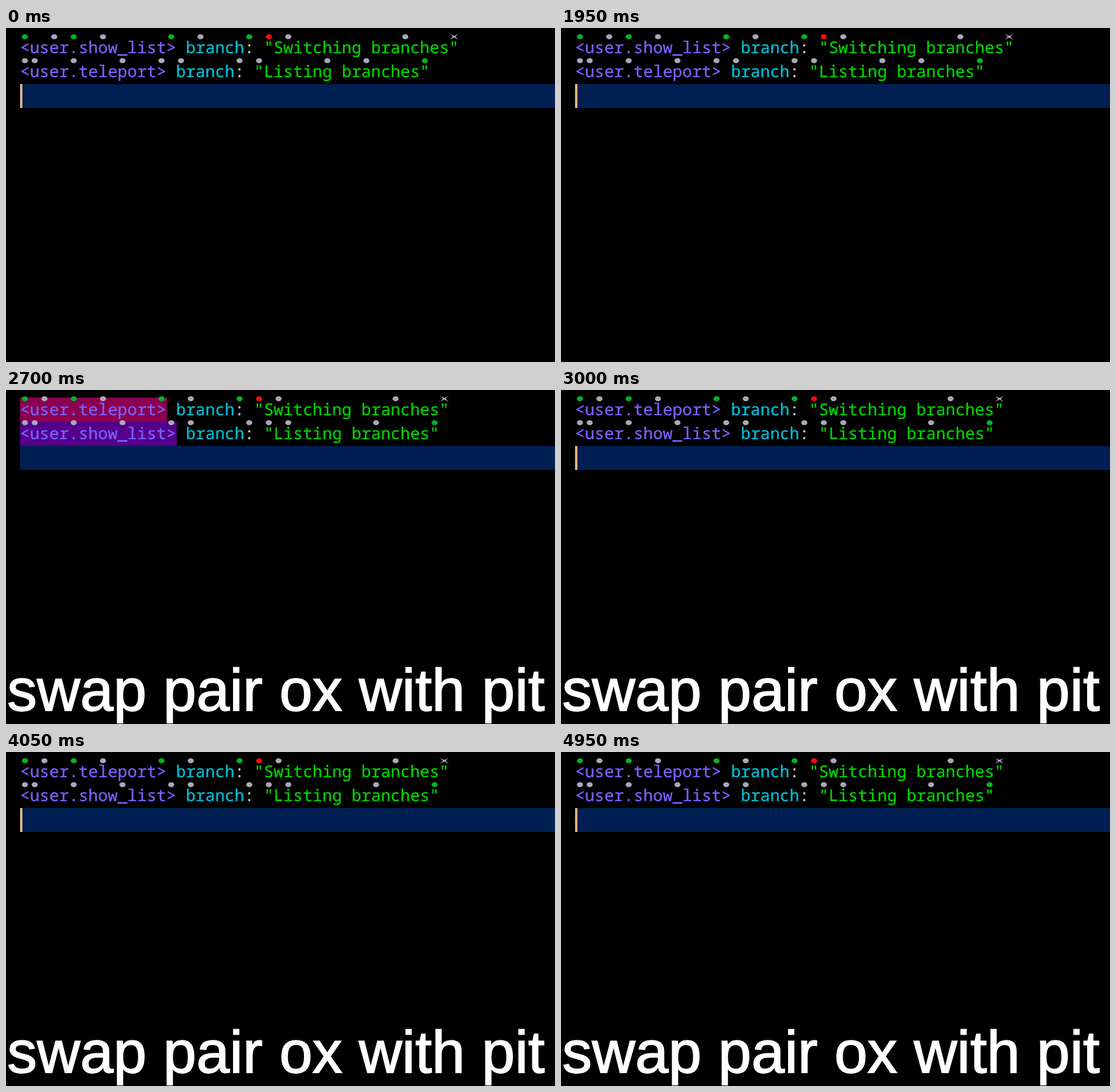
An HTML page for the animation above (5.55 s loop, 938 by 572 pixels).

```html
<!DOCTYPE html>
<html lang="en">
<head>
<meta charset="utf-8">
<title>Swap pair</title>
<style>
  html, body { margin: 0; width: 100%; height: 100%; overflow: hidden; background: #000; }
  svg { display: block; width: 938px; height: 572px; }
  text { white-space: pre; text-rendering: geometricPrecision; }
  .code { font: 27.78px "Noto Sans Mono", "DejaVu Sans Mono", monospace; stroke-width: 0.35px; }
  .caption {
    font: 102px "Liberation Sans", Arial, sans-serif;
    fill: #fff; stroke: #fff; stroke-width: 1.8px;
  }
  .capture { fill: #7a61ff; stroke: #7a61ff; }
  .word { fill: #00bfd8; stroke: #00bfd8; }
  .colon { fill: #c6c6ce; stroke: #c6c6ce; }
  .string { fill: #00d200; stroke: #00d200; }
  .gray { fill: #a9a8ba; }
  .green { fill: #00b524; }
  .red { fill: #f00c12; }

  .cursor, .before, .after, .marks, .caption { animation: 5550ms step-end infinite; }
  .cursor { animation-name: blink; }
  .before { animation-name: leave; }
  .after { animation-name: swapped; }
  .caption { animation-name: enter; }
  .marks { animation-name: flash; }

  /* percentages are ms / 5550 */
  @keyframes blink {
    0%, 18.9189%, 35.1351%, 54.0541%, 72.973%, 89.1892%, 100% { opacity: 1; }
    8.1081%, 27.027%, 45.9459%, 62.1622%, 81.0811% { opacity: 0; }
  }
  @keyframes leave {
    0% { opacity: 1; }
    48.6486%, 100% { opacity: 0; }
  }
  @keyframes swapped {
    0% { opacity: 0; }
    48.6486%, 100% { opacity: 1; }
  }
  @keyframes enter {
    0% { opacity: 0; }
    45.9459%, 100% { opacity: 1; }
  }
  @keyframes flash {
    0% { opacity: 0; }
    45.9459% { opacity: 1; }
    54.0541%, 100% { opacity: 0; }
  }
</style>
</head>
<body>
<svg viewBox="0 0 938 572">
  <rect width="938" height="572"/>
  <rect x="24" y="96" width="914" height="41" fill="#001f52"/>
  <rect class="cursor" x="24" y="96" width="4" height="41" fill="#e0b480"/>
  <g class="before" id="before"></g>
  <g class="after" id="after"></g>
  <text class="caption" x="2" y="548.5">swap pair ox with pit</text>
</svg>
<script>
  const LEFT = 24, CELL = 50 / 3;
  const TOPS = [13, 54];
  const MARK_COLORS = ["#8b0050", "#53008b"];
  const COLORS = { g: "green", r: "red", "": "gray" };

  function add(parent, tag, attrs, content) {
    const el = document.createElementNS("http://www.w3.org/2000/svg", tag);
    for (const key in attrs) el.setAttribute(key, attrs[key]);
    if (content) el.textContent = content;
    return parent.appendChild(el);
  }

  // hats: column plus optional g (green), r (red) or x (cross)
  function drawHat(parent, spec, top) {
    const cx = LEFT + (parseInt(spec) + 0.5) * CELL;
    const kind = spec.replace(/\d+/, "");
    if (kind === "x") {
      add(parent, "path", {
        class: "gray",
        transform: `translate(${cx} ${top + 2})`,
        d: "M-7.5-5.2Q-1-1.4 0-1.4Q1-1.4 7.5-5.2Q2.6-1 2.6 0Q2.6 1 7.5 5.2" +
           "Q1 1.4 0 1.4Q-1 1.4-7.5 5.2Q-2.6 1-2.6 0Q-2.6-1-7.5-5.2Z"
      });
    } else {
      add(parent, "ellipse", { class: COLORS[kind], cx, cy: top + 2, rx: 5.2, ry: 4.2 });
    }
  }

  function drawLine(parent, row, capture, string, hats) {
    const top = TOPS[row];
    add(parent, "rect", {
      class: "marks", x: LEFT, y: top,
      width: capture.length * CELL + 1, height: row ? 42 : 41,
      fill: MARK_COLORS[row]
    });
    const line = add(parent, "text", { class: "code", x: LEFT, y: top + 30 });
    add(line, "tspan", { class: "capture" }, capture);
    add(line, "tspan", { class: "word" }, " branch");
    add(line, "tspan", { class: "colon" }, ": ");
    add(line, "tspan", { class: "string" }, string);
    hats.split(" ").forEach(spec => drawHat(parent, spec, top));
  }

  const show = "<user.show_list>", teleport = "<user.teleport>";
  const first = '"Switching branches"', second = '"Listing branches"';
  const before = document.getElementById("before");
  const after = document.getElementById("after");

  drawLine(before, 0, show, first, "0g 3 5g 8 15g 18 23g 25r 27 39 44x");
  drawLine(before, 1, teleport, second, "0 1 5 10 14 16 22 24 31 35 41g");
  drawLine(after, 0, teleport, first, "0g 2 5g 8 14g 17 22g 24r 26 38 43x");
  drawLine(after, 1, show, second, "0 1 5 10 15 17 23 25 27 36 42g");
</script>
</body>
</html>
```
